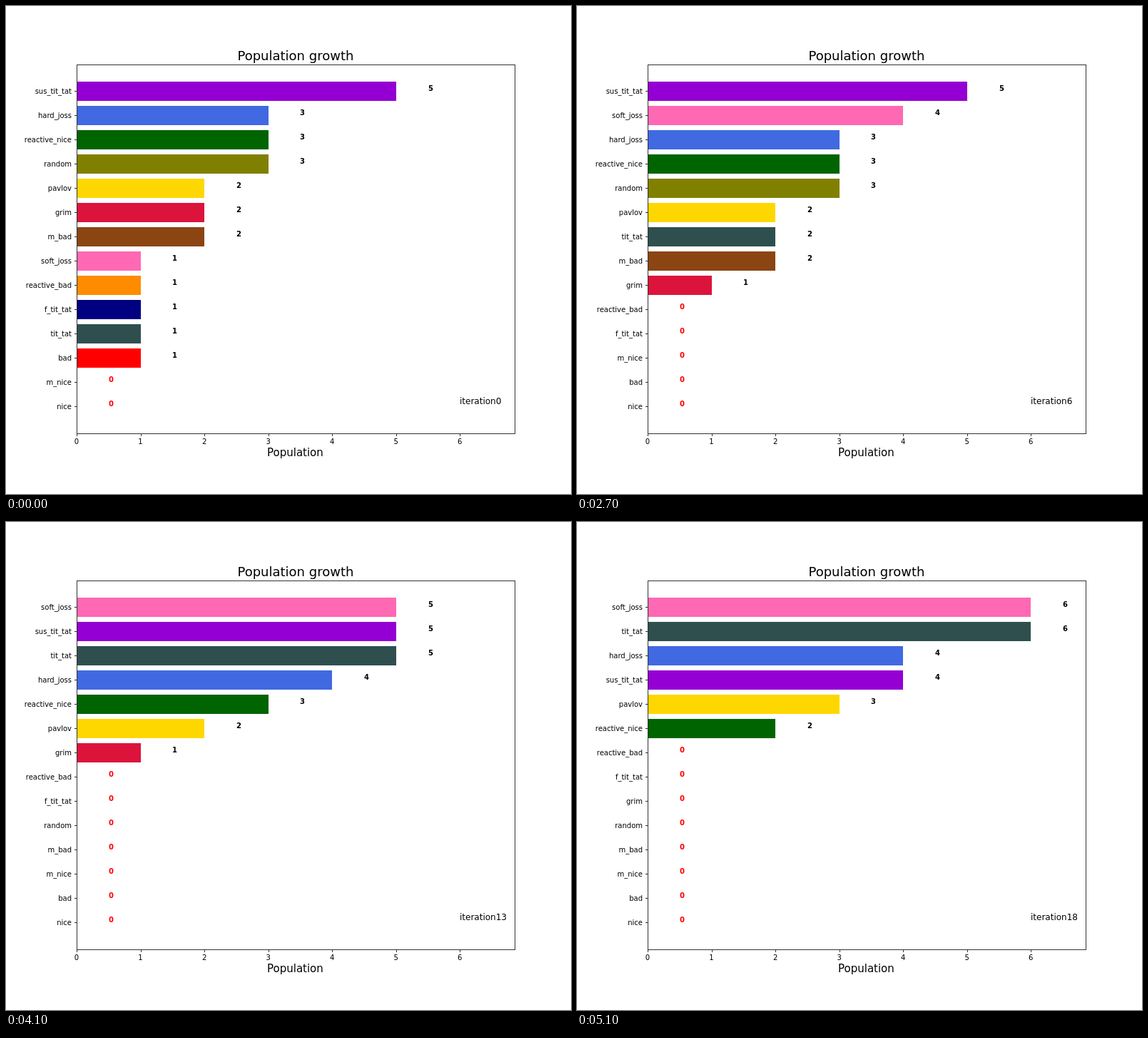
An HTML page with a canvas for the animation above (6.8 s loop, 792x684 px).

```html
<!DOCTYPE html>
<html lang="en">
<head>
<meta charset="utf-8">
<title>Population growth</title>
<style>
html, body { margin: 0; width: 100%; height: 100%; overflow: hidden; background: #fff; }
canvas { display: block; }
</style>
</head>
<body>
<canvas id="chart" width="792" height="684"></canvas>
<script>
const ctx = document.getElementById('chart').getContext('2d', { alpha: false });
const LEFT = 99, RIGHT = 713, TOP = 82, BOTTOM = 599;
const UNIT = 89.55, ROW = 34, FIRST = 119, AXIS = '#333';
const HOLD = 1700, STEP = 200, LOOP = 6800;

// name, colour, starting count; the listed order settles ties
const strategies = [
  ['soft_joss', 'hotpink', 1],
  ['hard_joss', 'royalblue', 3],
  ['sus_tit_tat', 'darkviolet', 5],
  ['reactive_nice', 'darkgreen', 3],
  ['pavlov', 'gold', 2],
  ['reactive_bad', 'darkorange', 1],
  ['f_tit_tat', 'navy', 1],
  ['grim', 'crimson', 2],
  ['random', 'olive', 3],
  ['tit_tat', 'darkslategray', 1],
  ['m_bad', 'saddlebrown', 2],
  ['m_nice', 'deepskyblue', 0],
  ['bad', 'red', 1],
  ['nice', 'limegreen', 0]
].map(([name, color, count]) => ({ name, color, count }));

// who gains one and who loses one in each iteration
const moves = [
  ['soft_joss', 'f_tit_tat'],
  ['f_tit_tat m_nice nice', 'random grim m_bad'],
  ['', ''],
  ['random grim m_bad soft_joss', 'f_tit_tat m_nice nice reactive_bad'],
  ['soft_joss', 'bad'],
  ['tit_tat', 'grim'],
  ['hard_joss', 'random'],
  ['soft_joss', 'm_bad'],
  ['tit_tat', 'random'],
  ['tit_tat', 'pavlov'],
  ['tit_tat', 'm_bad'],
  ['pavlov', 'random'],
  ['', ''],
  ['hard_joss', 'reactive_nice'],
  ['soft_joss', 'reactive_nice'],
  ['pavlov', 'hard_joss'],
  ['reactive_nice', 'grim'],
  ['tit_tat', 'sus_tit_tat']
].map(pair => pair.map(names => names.split(' ')));

const rank = list => [...list].sort((a, b) => b.count - a.count);
const states = [strategies];
for (const [up, down] of moves) {
  states.push(states.at(-1).map(s => ({
    ...s, count: s.count + up.includes(s.name) - down.includes(s.name)
  })));
}
const rankings = states.map(rank);

const xAt = value => LEFT + value * UNIT;

function rect(x, y, w, h, color) {
  ctx.fillStyle = color;
  ctx.fillRect(x, y, w, h);
}

function text(str, x, y, size, align = 'left', color = '#000', weight = 'normal') {
  ctx.font = `${weight} ${size}px "DejaVu Sans", sans-serif`;
  ctx.textAlign = align;
  ctx.fillStyle = color;
  ctx.fillText(str, x, y);
}

function drawAxes() {
  rect(LEFT, TOP, 1, BOTTOM - TOP + 1, AXIS);
  rect(RIGHT, TOP, 1, BOTTOM - TOP + 1, AXIS);
  rect(LEFT, TOP, RIGHT - LEFT + 1, 1, AXIS);
  rect(LEFT, BOTTOM, RIGHT - LEFT + 1, 1, AXIS);
  for (let v = 0; v <= 6; v++) {
    rect(Math.round(xAt(v)), BOTTOM + 1, 1, 3, AXIS);
    text(v, xAt(v), 614, 10, 'center');
  }
  text('Population growth', 405.9, 76, 18, 'center');
  text('Population', 405.4, 631, 15, 'center');
}

function draw(iteration) {
  rect(0, 0, 792, 684, '#fff');
  rankings[iteration].forEach(({ name, color, count }, i) => {
    const y = FIRST + i * ROW;
    rect(LEFT, y - 13, Math.round(xAt(count)) - LEFT, 27, color);
    rect(LEFT - 3, y, 3, 1, AXIS);
    text(name, 92, y + 4, 10, 'right');
    text(count, Math.round(xAt(count + 0.5)), y, 10, 'left', count ? '#000' : '#f00', 'bold');
  });
  drawAxes();
  text('iteration' + iteration, 636, 558, 12);
}

const start = performance.now();
function tick() {
  const t = (performance.now() - start) % LOOP;
  const passed = Math.floor((t - HOLD) / STEP) + 1;
  draw(Math.max(0, Math.min(moves.length, passed)));
  requestAnimationFrame(tick);
}
tick();
</script>
</body>
</html>
```
